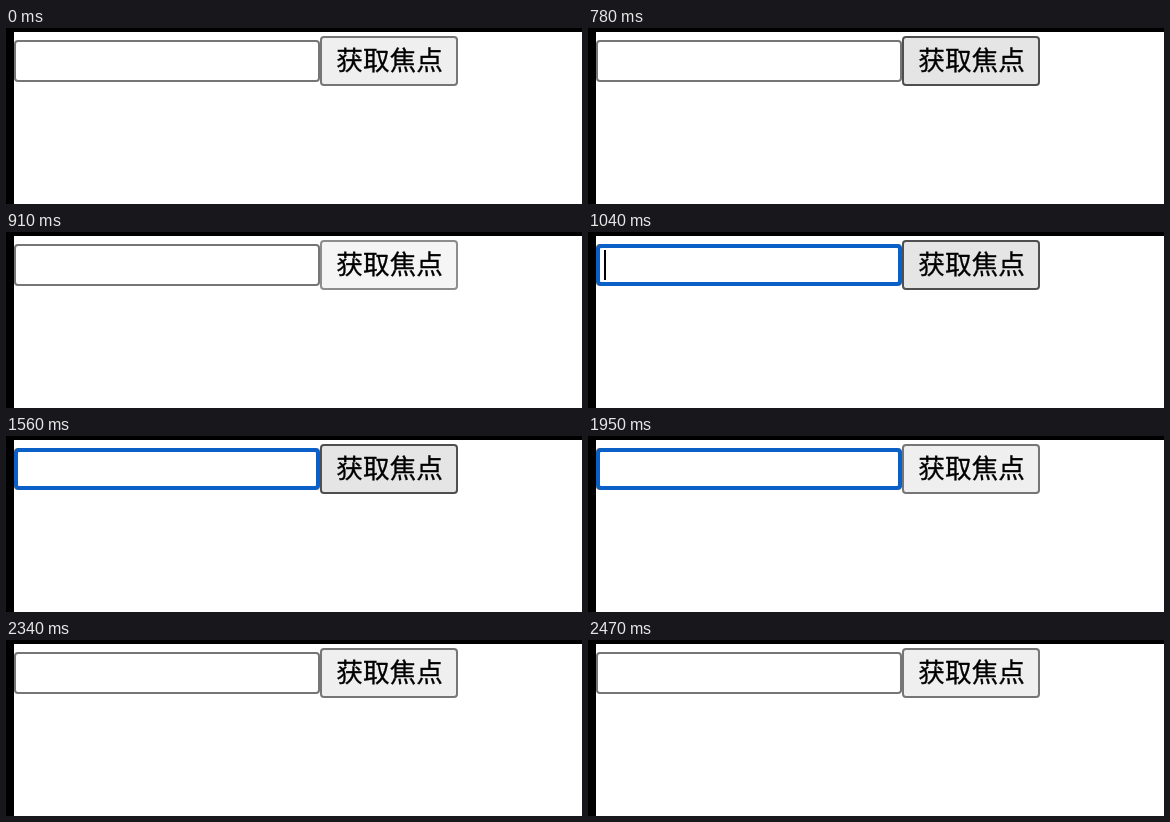
Animation of 576x176 px, one loop 2.6 s. Source, as an HTML page:

```html
<!DOCTYPE html>
<html lang="zh-CN">
<head>
<meta charset="utf-8">
<title>获取焦点</title>
<style>
html, body { margin: 0; width: 100%; height: 100%; overflow: hidden; background: #000; }
svg { display: block; width: 576px; height: 176px; }
text { font: 26.67px "Noto Sans CJK SC", "Noto Sans CJK", sans-serif; }
</style>
</head>
<body>
<svg viewBox="0 0 576 176">
  <rect x="8" y="4" width="568" height="172" fill="#fff"/>
  <rect id="field" x="9" y="13" width="304" height="40" rx="3" fill="#fff" stroke="#767676" stroke-width="2"/>
  <rect id="ring" x="10" y="14" width="302" height="38" rx="3" fill="#fff" stroke="#0b60c8" stroke-width="4"/>
  <rect id="caret" x="16" y="18" width="2" height="30" fill="#000"/>
  <rect id="button" x="315" y="9" width="136" height="48" rx="3" stroke-width="2"/>
  <text x="330.3" y="41.6" fill="#000" stroke="#000" stroke-width="0.3">获取焦点</text>
</svg>
<script>
const LOOP = 2600;
const HOVER = 780, PRESS = 910, FOCUS = 1040, LEAVE = 1950, BLUR = 2340;
const BLINK = 520;

const looks = {
  idle: ['#efefef', '#767676'],
  hover: ['#e5e5e5', '#4f4f4f'],
  press: ['#f5f5f5', '#8d8d8d']
};

const el = id => document.getElementById(id);
const ring = el('ring'), caret = el('caret'), button = el('button');
const show = (node, on) => node.setAttribute('visibility', on ? 'visible' : 'hidden');

function buttonState(t) {
  if (t < HOVER || t >= LEAVE) return 'idle';
  return t >= PRESS && t < FOCUS ? 'press' : 'hover';
}

function draw(t) {
  const focused = t >= FOCUS && t < BLUR;
  const lit = Math.floor((t - FOCUS) / BLINK) % 2 === 0;
  const [fill, stroke] = looks[buttonState(t)];
  show(ring, focused);
  show(caret, focused && lit);
  button.setAttribute('fill', fill);
  button.setAttribute('stroke', stroke);
}

const start = performance.now();
function tick() {
  draw((performance.now() - start) % LOOP);
  requestAnimationFrame(tick);
}
draw(0);
requestAnimationFrame(tick);
</script>
</body>
</html>
```
